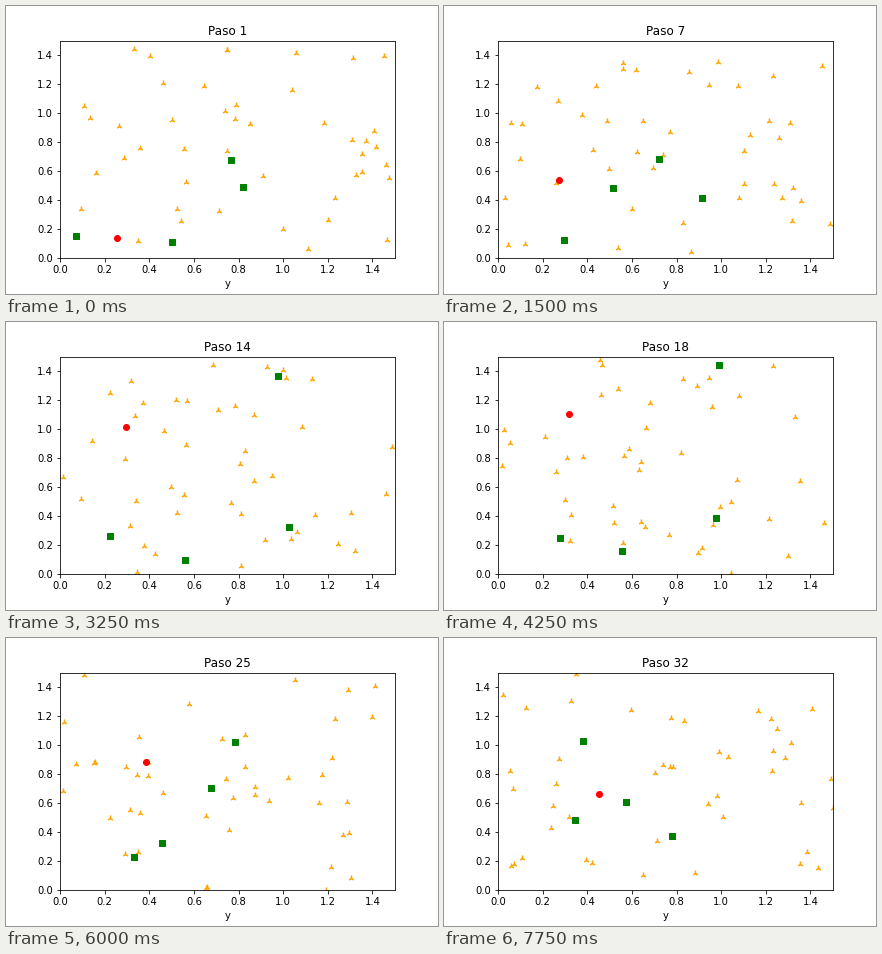
Write a matplotlib script that moves like this. It is 432 px wide and 288 px high and loops after 8 s.

```python
import numpy as np
import matplotlib.pyplot as plt
from matplotlib.animation import FuncAnimation

SIZE = 1.5      # side of the square box
STEPS = 32
LIGHT = 45

# Light particles start anywhere and drift in any direction.
rng = np.random.default_rng(4)
start = rng.uniform(0, SIZE, (LIGHT, 2))
angle = rng.uniform(0, 2 * np.pi, LIGHT)
speed = rng.uniform(.03, .08, LIGHT)
velocity = (speed * [np.cos(angle), np.sin(angle)]).T

# Heavy particles fly straight between collisions: (step, x, y).
RED = [(1, .255, .135), (16.15, .302, 1.159), (32, .452, .66)]
GREENS = [
    [(1, .07, .155), (15, .597, .09), (30, .39, .44), (32, .345, .48)],
    [(1, .50, .11), (7, .515, .485), (14, .225, .265), (18, .28, .245),
     (25, .33, .23), (32, .78, .375)],
    [(1, .765, .675), (7, .72, .685), (14, .975, 1.365), (17, 1.02, 1.5),
     (32, .575, .605)],
    [(1, .82, .49), (16, 1.06, .295), (32, .38, 1.025)],
]


def bounce(p):
    """Fold free flight back into the box at its walls."""
    return SIZE - np.abs(p % (2 * SIZE) - SIZE)


def along(path, step):
    t, x, y = np.transpose(path)
    return np.interp(step, t, x), np.interp(step, t, y)


fig, ax = plt.subplots(figsize=(6, 4), dpi=72)
fig.subplots_adjust(bottom=.125)
ax.set(xlim=(0, SIZE), ylim=(0, SIZE), xlabel="y")
title = ax.set_title("Paso 1")
light = ax.scatter([], [], marker="2", color="orange")
green = ax.scatter([], [], marker="s", color="green")
red = ax.scatter([], [], marker="o", color="red")


def update(i):
    step = i + 1
    title.set_text(f"Paso {step}")
    light.set_offsets(bounce(start + velocity * i))
    green.set_offsets([along(path, step) for path in GREENS])
    red.set_offsets([along(RED, step)])
    return title, light, green, red


anim = FuncAnimation(fig, update, frames=STEPS, interval=250,
                     repeat=True, repeat_delay=0)
plt.show()
```
